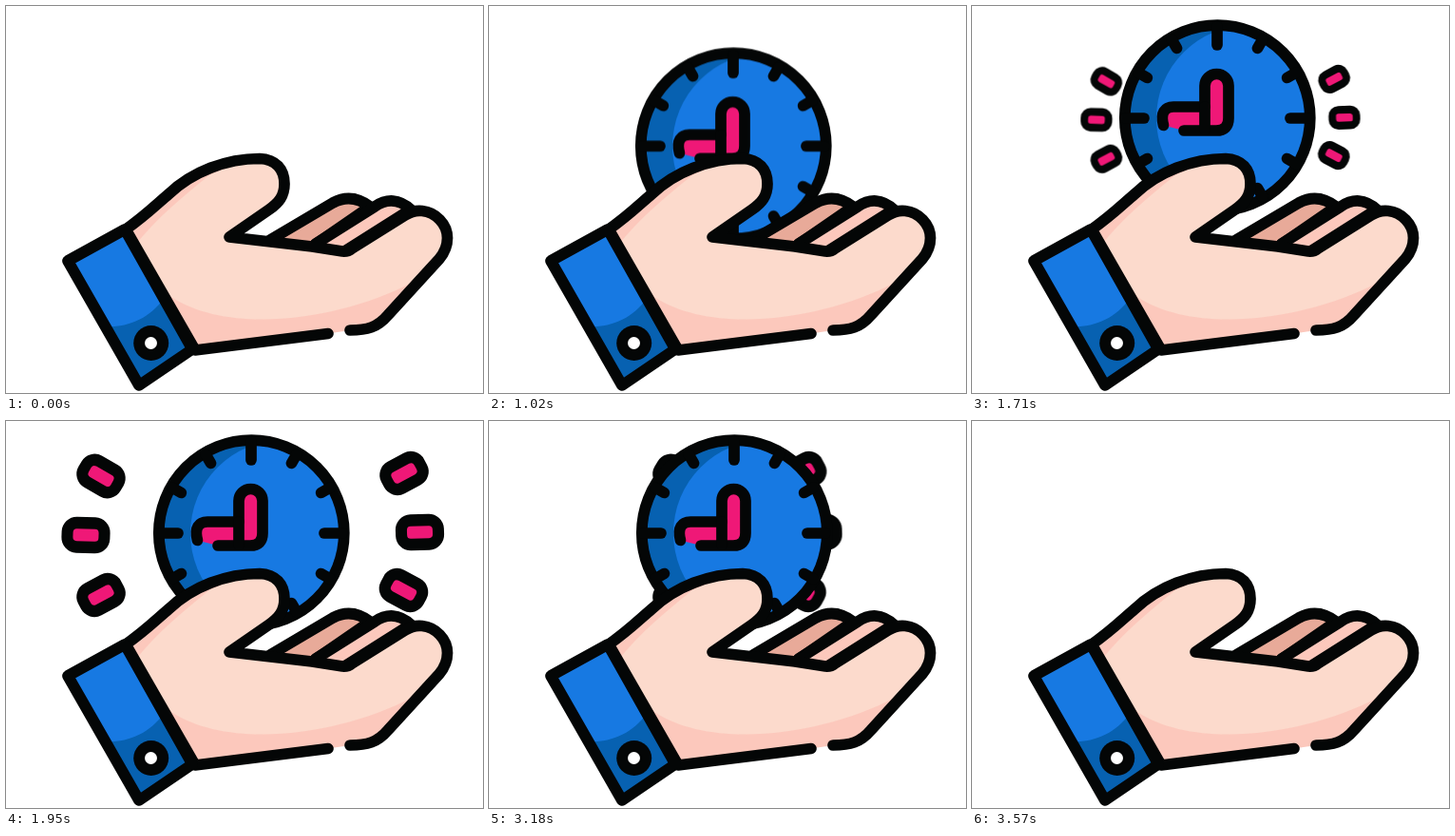
Write an HTML page that moves like this. It is 502 px wide and 407 px high and loops after 3600 ms.

```html
<!DOCTYPE html>
<html lang="en">
<head>
<meta charset="utf-8">
<title>Clock in hand</title>
<style>
  html, body { margin: 0; width: 100%; height: 100%; overflow: hidden; background: #fff; }
  svg { display: block; width: 100vw; height: 100vh; }

  .line { stroke: #040606; stroke-width: 11.7; stroke-linecap: round; stroke-linejoin: round; }
  .open { fill: none; }
  .ink { fill: #040606; }
  .blue { fill: #1779e2; }
  .navy { fill: #0761b1; }
  .pink { fill: #ef1877; }
  .skin { fill: #fcdacc; }
  .blush { fill: #fcc8bc; }
  .tan { fill: #e8aa99; }

  #clock, .rays { animation: 3600ms linear -6ms infinite; }
  #clock { animation-name: clock; }
  #left { animation-name: left; transform-origin: 219px 119px; }
  #right { animation-name: right; transform-origin: 310px 118px; }

  /* The motion advances in 30 ms ticks. */
  @keyframes clock {
    0% { transform: translate(-8.5px, 249.5px); animation-timing-function: step-end; }
    15.8333% { transform: translate(-8.5px, 249.5px); animation-timing-function: steps(17); }
    30%, 91.6667% { transform: translate(0, 0); animation-timing-function: steps(9); }
    99.1667%, 100% { transform: translate(-8.5px, 258px); }
  }
  @keyframes left {
    0%, 35% { transform: translateX(0) scale(0); animation-timing-function: steps(23); }
    54.1667%, 79.1667% { transform: translateX(0) scale(1); animation-timing-function: steps(15); }
    91.6667% { transform: translateX(133.5px) scale(1); animation-timing-function: step-start; }
    91.67%, 100% { transform: translateX(133.5px) scale(0); }
  }
  @keyframes right {
    0%, 35% { transform: translateX(0) scale(0); animation-timing-function: steps(23); }
    54.1667%, 79.1667% { transform: translateX(0) scale(1); animation-timing-function: steps(15); }
    91.6667% { transform: translateX(-122px) scale(1); animation-timing-function: step-start; }
    91.67%, 100% { transform: translateX(-122px) scale(0); }
  }
</style>
</head>
<body>
<svg viewBox="0 0 502 407" preserveAspectRatio="none">
  <defs>
    <path id="palm" d="M339 344.500 L199 362 L126 235 C146 221 158 209 171 198
      C196 174 232 160.500 267 160.500
      C284 161 293 172 293 187 C293 200 287 207 277 214 L235 243 L322 253 L354 258
      Q360 258.500 364 255 L420 220 C428 215 434 215 438 215.500 C452 217 464.500 229 464.500 244
      C464.500 253 461 260 456 266 L402 325 C391 338 380 341 362 341"/>
    <path id="cuff" d="M65 268 L125 235 L196 361 L140 399 Z"/>
    <circle id="face" cx="258.300" cy="117.700" r="97.500"/>
    <g id="ray">
      <rect class="ink" x="-25.500" y="-19" width="51" height="38" rx="16"/>
      <rect class="pink" x="-13.500" y="-6.500" width="27" height="13" rx="4"/>
    </g>
    <clipPath id="inPalm"><use href="#palm"/></clipPath>
    <clipPath id="inCuff"><use href="#cuff"/></clipPath>
    <clipPath id="inFace"><use href="#face"/></clipPath>
    <clipPath id="above"><path d="M0 0 H502 V256 H0 Z"/></clipPath>
  </defs>

  <g id="left" class="rays">
    <use href="#ray" transform="translate(100 58) rotate(30)"/>
    <use href="#ray" transform="translate(84 120) rotate(2)"/>
    <use href="#ray" transform="translate(100 183) rotate(-28)"/>
  </g>
  <g id="right" class="rays">
    <use href="#ray" transform="translate(419 55) rotate(-28)"/>
    <use href="#ray" transform="translate(435.500 117) rotate(-2)"/>
    <use href="#ray" transform="translate(418.500 178) rotate(28)"/>
  </g>

  <g clip-path="url(#above)">
    <g id="clock">
      <use href="#face" class="navy"/>
      <circle class="blue" cx="292" cy="118" r="98" clip-path="url(#inFace)"/>
      <use href="#face" class="line open"/>
      <g id="ticks" class="line" transform="translate(258 118)"></g>
      <path class="line pink" d="M201.500 125.500 C198 112 203 106 212 106 H245 V84
        a12.500 12.500 0 0 1 25 0 V118 Q270 131 257 131 H223"/>
      <path class="line open" d="M245 106 V130"/>
    </g>
  </g>

  <path class="line tan" d="M278 246 L344 207 C357 200 370 201 383 211 L325 251"/>
  <path class="line blush" d="M326 250 L388 211 C401 202 414 203 426 214 L358 257"/>
  <use href="#palm" class="blush"/>
  <path class="skin" clip-path="url(#inPalm)" d="M138 249 C160 222 184 202 214 178 L300 140
    L480 200 V265 L427 291 C350 331 235 346 174 306 Z"/>
  <use href="#palm" class="line open"/>

  <use href="#cuff" class="blue"/>
  <path class="navy" clip-path="url(#inCuff)" d="M100 337 C128 339 150 329 166 308 L210 361 L140 407 Z"/>
  <use href="#cuff" class="line open"/>
  <circle class="ink" cx="152.700" cy="354.500" r="18.500"/>
  <circle cx="152.500" cy="354.500" r="6.500" fill="#fff"/>
</svg>
<script>
  const ticks = document.getElementById("ticks");
  for (let hour = 0; hour < 12; hour++) {
    const tick = document.createElementNS("http://www.w3.org/2000/svg", "path");
    tick.setAttribute("d", `M0 -96 V${hour % 3 ? -85 : -77}`);
    tick.setAttribute("transform", `rotate(${hour * 30})`);
    ticks.append(tick);
  }
</script>
</body>
</html>
```
